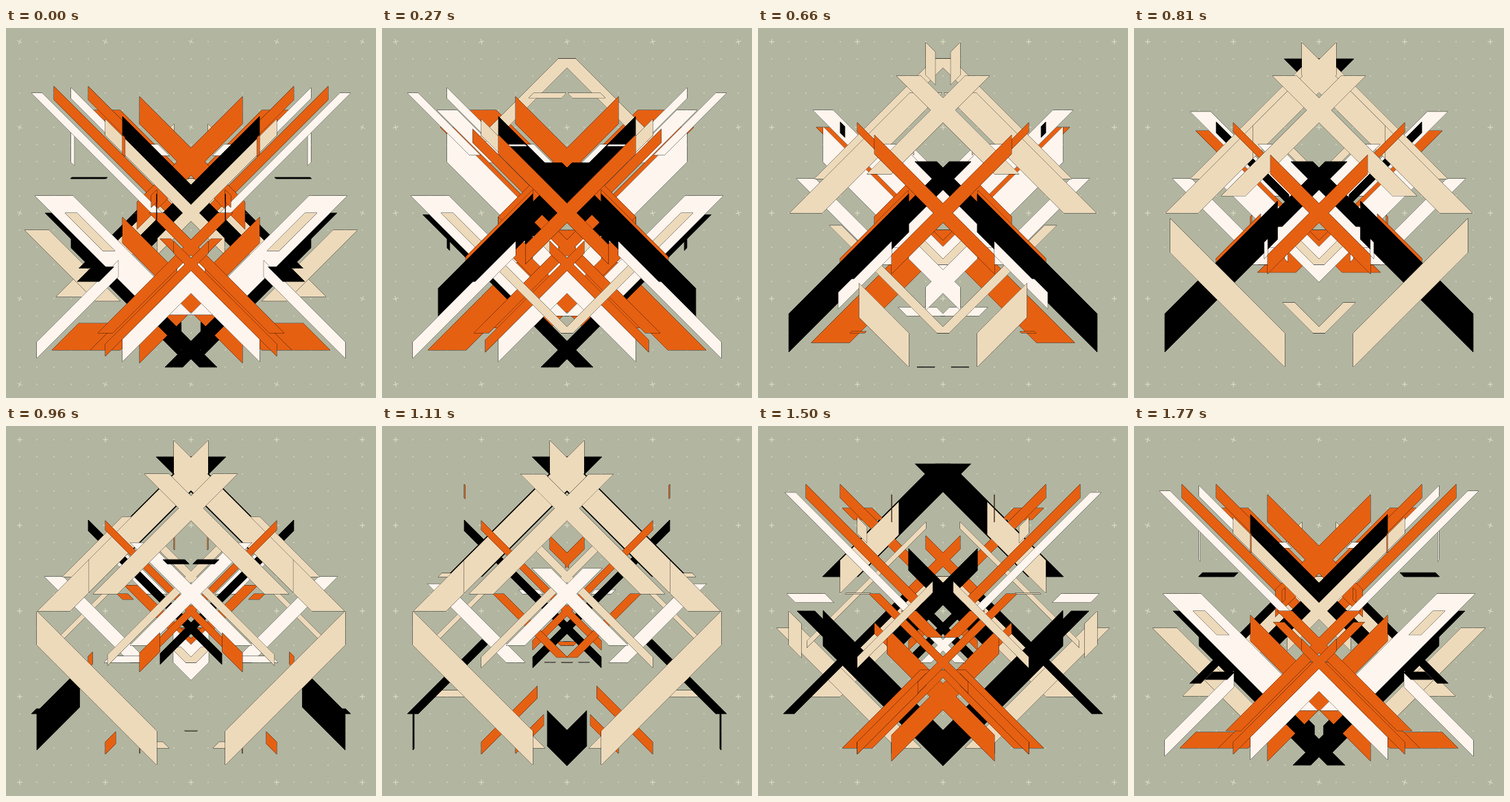
These frames come from a looping animation (540x540 px, 1.8 s). An HTML page with a canvas:

```html
<!DOCTYPE html>
<html lang="en">
<head>
<meta charset="utf-8">
<title>Mirrored bars</title>
<style>
html, body { margin: 0; width: 100%; height: 100%; overflow: hidden; background: #b2b5a0; }
canvas { display: block; width: 540px; height: 540px; }
</style>
</head>
<body>
<canvas id="stage" width="540" height="540"></canvas>
<script>
const ctx = document.getElementById('stage').getContext('2d');
const SIZE = 540, EDGE = 20, CELL = 25;
const LOOP = 1800, STEP = 30;
const TRAVEL = 490;  // time an end takes from one tip to the other
const DELAY = 725;   // time between the start of the head and of the tail
const WHITE = '#fdf5ee', SAND = '#eddabb', FIRE = '#e66012', INK = '#000';
const SE = [1, 1], SW = [-1, 1], NE = [1, -1], NW = [-1, -1];
let now = 0;

const grid = n => EDGE + n * CELL;
const mod = (a, n) => ((a % n) + n) % n;
const clamp = v => Math.min(1, Math.max(0, v));
const ease = p => p < .5 ? 4 * p ** 3 : 1 - 4 * (1 - p) ** 3;

function trace(path, points, place) {
  points.forEach(([x, y], i) => i ? path.lineTo(place(x), y) : path.moveTo(place(x), y));
  path.closePath();
}

// A bar and its mirror image start at a grid point and run diagonally.
// The head grows first, then the tail follows it by the same easing.
// cut: 'v' for upright ends, 'h' for level ends; half: half size of the cut.
function bar(color, cut, half, x, y, way, cells, start) {
  const age = mod(now - start, LOOP);
  const head = ease(clamp(age / TRAVEL));
  const tail = ease(clamp((age - DELAY) / TRAVEL));
  if (head - tail < .0003) return;
  const at = p => [grid(x + way[0] * cells * p), grid(y + way[1] * cells * p)];
  const [ax, ay] = at(tail), [bx, by] = at(head);
  const dx = cut === 'h' ? half : 0, dy = half - dx;
  const points = [[ax - dx, ay - dy], [ax + dx, ay + dy], [bx + dx, by + dy], [bx - dx, by - dy]];
  const pair = new Path2D();
  trace(pair, points, v => v);
  trace(pair, points.reverse(), v => SIZE - v);
  ctx.stroke(pair);
  ctx.fillStyle = color;
  ctx.fill(pair);
}

function backdrop() {
  ctx.fillStyle = '#b2b5a0';
  ctx.fillRect(0, 0, SIZE, SIZE);
  ctx.fillStyle = ctx.strokeStyle = 'rgba(250,246,222,.65)';
  ctx.lineWidth = 1;
  const p = clamp(mod(now - 1560, LOOP) / 690);
  const turn = (1 - Math.cos(Math.PI * p)) * Math.PI / 4;
  for (let i = 0; i <= 20; i++) for (let j = 0; j <= 20; j++) {
    ctx.save();
    ctx.translate(grid(i), grid(j));
    if (i % 5 || j % 5) {
      ctx.fillRect(-.75, -.75, 1.5, 1.5);
    } else {
      ctx.rotate(turn);
      ctx.beginPath();
      ctx.moveTo(-4, 0); ctx.lineTo(4, 0);
      ctx.moveTo(0, -4); ctx.lineTo(0, 4);
      ctx.stroke();
    }
    ctx.restore();
  }
}

function backBars() {
  bar(SAND, 'h', 25, 3, 15, NE, 7, 995);
  bar(SAND, 'h', 18, 8, 18, NW, 7, 846);
  bar(FIRE, 'h', 28, 3, 18, NE, 7, 1613);
  bar(INK, 'h', 26, 11, 1, SW, 7, 655);
  bar(INK, 'h', 8, 1, 16, NE, 8, 858);
  bar(FIRE, 'h', 22, 5, 4, SE, 4, 1330);
  bar(FIRE, 'v', 10, 4, 3, SE, 4, 1040);
  bar(SAND, 'v', 5, 2, 12, NE, 7, 710);
  bar(WHITE, 'v', 8, 3, 3, SE, 6, 1485);
  bar(FIRE, 'h', 10, 3, 5, SE, 7, 1790);
  bar(WHITE, 'v', 26, 3, 6, SE, 7, 1708);
  bar(WHITE, 'h', 15, 3, 4, SE, 5, 1805);
  bar(WHITE, 'h', 14, 2, 8, SE, 5, 250);
  bar(SAND, 'h', 8, 7, 10, SE, 3, 1750);
  bar(INK, 'v', 8, 4, 5, SE, 8, 560);
  bar(FIRE, 'v', 10, 9, 6, SE, 3, 890);
}

function middleBars() {
  bar(SAND, 'h', 13, 10, 1, SW, 7, 1790);
  bar(SAND, 'h', 24, 9, 3, SW, 7, 165);
  bar(SAND, 'v', 24, 11, 1, SW, 7, 528);
  bar(FIRE, 'v', 7, 5, 5, SE, 7, 447);
  bar(INK, 'v', 26, 10, 18, NW, 7, 941);
  bar(WHITE, 'h', 27, 7, 6, SE, 7, 1660);
  bar(FIRE, 'v', 10, 2, 3, SE, 7, 1126);
  bar(FIRE, 'v', 20, 7, 4, SE, 7, 1463);
  bar(INK, 'v', 16, 13, 12, NW, 7, 1213);
  bar(SAND, 'v', 12, 5, 5, SE, 7, 1368);
  bar(FIRE, 'v', 8, 13, 18, NW, 7, 920);
  bar(FIRE, 'v', 19, 13, 18, NW, 7, 1156);
  bar(INK, 'h', 13, 2, 10, SE, 9, 1275);
  bar(WHITE, 'h', 28, 2, 9, SE, 7, 1372);
  bar(WHITE, 'h', 8, 11, 13, NW, 10, 1075);
  bar(FIRE, 'h', 22, 5, 18, NE, 5, 1148);
  bar(WHITE, 'v', 17, 6, 18, NE, 6, 1490);
  bar(FIRE, 'h', 11, 12, 10, SW, 7, 1314);
  bar(FIRE, 'v', 9, 5, 18, NE, 4, 796);
  bar(FIRE, 'h', 8, 6, 9, SE, 6, 844);
  bar(FIRE, 'v', 9, 5, 18, NE, 6, 1240);
}

function frontBars() {
  bar(SAND, 'h', 9, 3, 10, SE, 7, 1590);
  bar(SAND, 'v', 8, 12, 6, SW, 7, 553);
  bar(WHITE, 'h', 14, 7, 6, SE, 6, 190);
  bar(FIRE, 'v', 9, 8, 9, SW, 4, 1667);
  bar(INK, 'v', 28, 8, 10, SW, 7, 1764);
  bar(WHITE, 'v', 12, 1, 18, NE, 6, 1493);
  bar(INK, 'h', 16, 4, 14, NE, 7, 1647);
  bar(SAND, 'h', 18, 12, 2, SW, 7, 345);
  bar(FIRE, 'v', 14, 6, 6, SE, 7, 1715);
  bar(SAND, 'v', 25, 8, 18, NW, 7, 430);
}

function frame() {
  now = Math.floor(mod(performance.now(), LOOP) / STEP) * STEP;
  backdrop();
  ctx.strokeStyle = 'rgba(0,0,0,.75)';
  backBars();
  middleBars();
  frontBars();
  requestAnimationFrame(frame);
}
frame();
</script>
</body>
</html>
```
